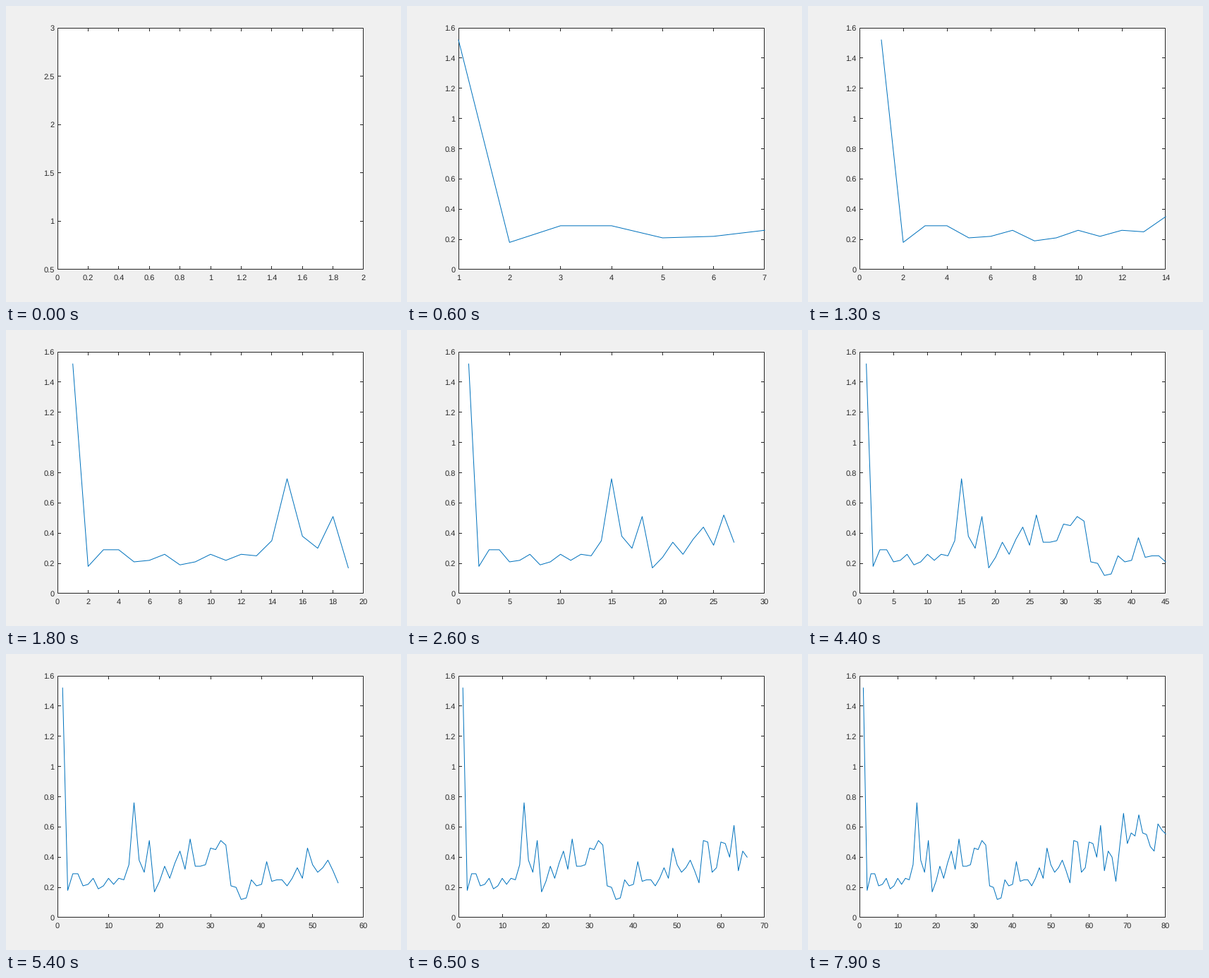
Write a matplotlib script that moves like this. It is 560 px wide and 420 px high and loops after 8 s.

```python
import math

import matplotlib.pyplot as plt
import numpy as np
from matplotlib.animation import FuncAnimation
from matplotlib.collections import LineCollection
from matplotlib.patches import Rectangle

plt.rcParams.update({
    "font.family": "Liberation Sans",
    "text.hinting": "none",
    "path.simplify": False,
    "toolbar": "None",
})

W, H, DPI = 560, 420, 80
PX = 72 / DPI                       # points per pixel
LEFT, TOP, WIDTH, HEIGHT = 73, 31, 434, 343
RIGHT, BOTTOM = LEFT + WIDTH, TOP + HEIGHT
TICK = 5
INK, BLUE, GREY = "#262626", "#0072bd", "#f0f0f0"

# samples in hundredths
DATA = np.array([
    152, 18, 29, 29, 21, 22, 26, 19, 21, 26,
    22, 26, 25, 35, 76, 38, 30, 51, 17, 24,
    34, 26, 36, 44, 32, 52, 34, 34, 35, 46,
    45, 51, 48, 21, 20, 12, 13, 25, 21, 22,
    37, 24, 25, 25, 21, 26, 33, 26, 46, 35,
    30, 33, 38, 31, 23, 51, 50, 30, 33, 50,
    49, 40, 61, 31, 44, 40, 24, 47, 69, 49,
    56, 54, 68, 56, 55, 47, 44, 62, 58, 55.4,
]) / 100


def nice_ticks(lo, hi):
    """Ticks with the smallest round step that needs at most ten intervals."""
    if lo == hi:
        lo, hi = lo - 1, hi + 1
    for step in (0.1, 0.2, 0.5, 1, 2, 5, 10):
        a = math.floor(lo / step + 1e-9)
        b = math.ceil(hi / step - 1e-9)
        if b - a <= 10:
            return np.arange(a, b + 1) * step


def to_px(values, ticks, start, span):
    return start + span * (values - ticks[0]) / (ticks[-1] - ticks[0])


fig = plt.figure(figsize=(W / DPI, H / DPI), dpi=DPI, facecolor=GREY)
ax = fig.add_axes([0, 0, 1, 1])
ax.set(xlim=(0, W), ylim=(H, 0))
ax.axis("off")

ax.add_patch(Rectangle((LEFT + 0.5, TOP + 0.5), WIDTH - 1, HEIGHT - 1,
                       fc="white", ec=INK, lw=PX, snap=False, zorder=0))
marks = LineCollection([], colors=INK, linewidths=PX, capstyle="butt",
                       snap=False, zorder=1)
ax.add_collection(marks, autolim=False)
curve, = ax.plot([], [], color=BLUE, lw=PX, snap=False, zorder=2)


def make_labels(ha):
    return [ax.text(0, 0, "", size=11 * PX, color=INK, ha=ha, va="baseline")
            for _ in range(11)]


x_labels, y_labels = make_labels("center"), make_labels("right")


def set_labels(labels, ticks, spots):
    for label in labels:
        label.set_text("")
    for label, tick, spot in zip(labels, ticks, spots):
        label.set_text(f"{tick:.4g}")
        label.set_position(spot)


def draw(frame):
    n = frame + 1
    x, y = np.arange(1, n + 1), DATA[:n]
    xt, yt = nice_ticks(1, n), nice_ticks(y.min(), y.max())
    tx = to_px(xt, xt, LEFT, WIDTH)
    ty = to_px(yt, yt, BOTTOM, -HEIGHT)

    segments = []
    for p in np.floor(tx[1:-1]) + 0.5:
        segments += [[(p, TOP), (p, TOP + TICK)],
                     [(p, BOTTOM - TICK), (p, BOTTOM)]]
    for p in np.floor(ty[1:-1]) + 0.5:
        segments += [[(LEFT, p), (LEFT + TICK, p)],
                     [(RIGHT - TICK, p), (RIGHT, p)]]
    marks.set_segments(segments)

    set_labels(x_labels, xt, [(p, BOTTOM + 15) for p in tx])
    set_labels(y_labels, yt, [(LEFT - 4.6, p + 4) for p in ty])

    if n > 1:
        curve.set_data(to_px(x, xt, LEFT, WIDTH), to_px(y, yt, BOTTOM, -HEIGHT))
    else:
        curve.set_data([], [])
    return [marks, curve, *x_labels, *y_labels]


anim = FuncAnimation(fig, draw, frames=len(DATA), interval=100,
                     repeat=True, blit=False)
plt.show()
```
